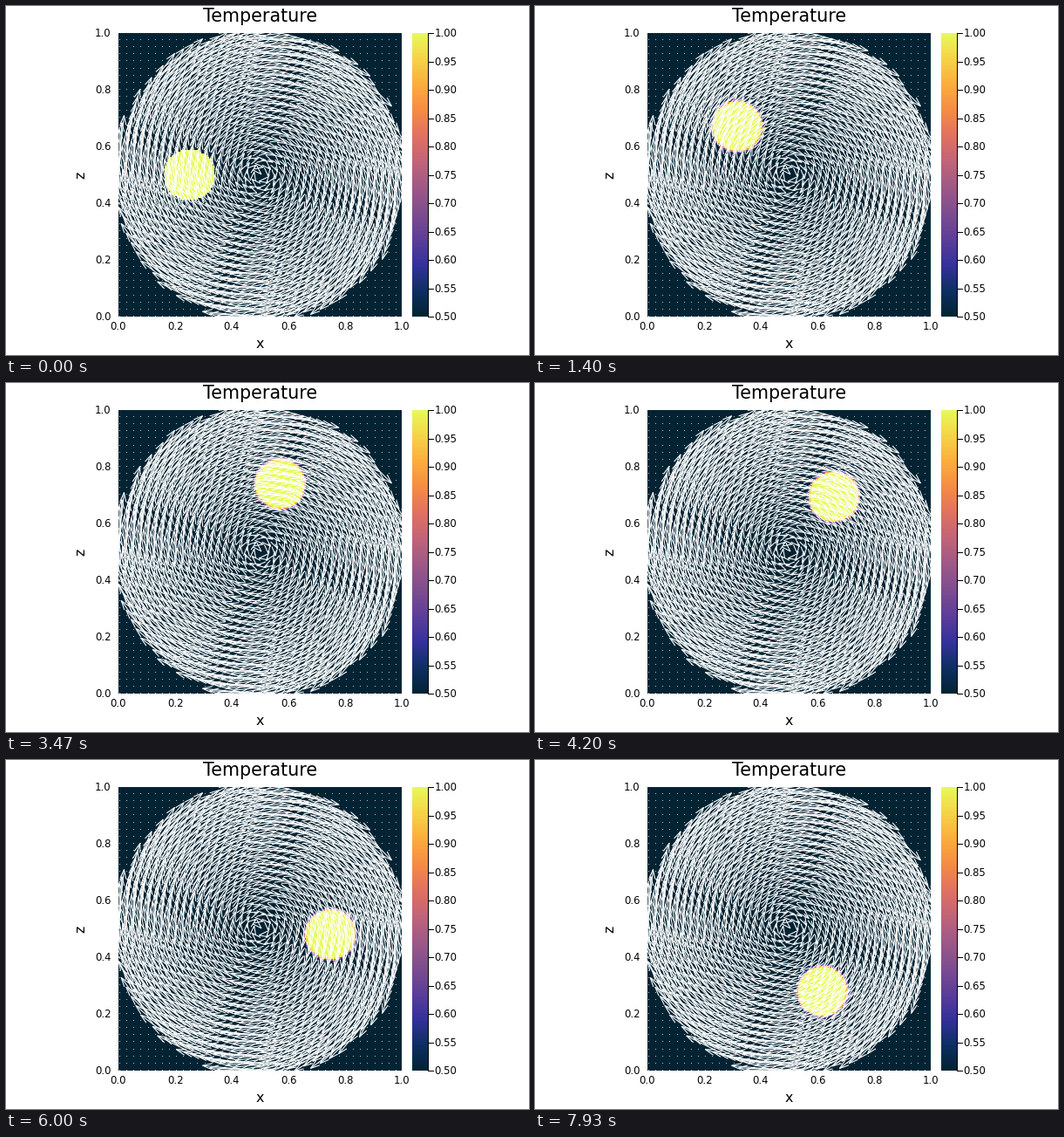
Write a matplotlib script that moves like this. It is 600x400 px and loops after 8 s.

```python
import numpy as np
import matplotlib.pyplot as plt
from matplotlib.animation import FuncAnimation
from matplotlib.collections import LineCollection
from matplotlib.colors import LinearSegmentedColormap

W, H, DPI = 600, 400, 100
LEFT, TOP, SIDE = 129, 31, 325
BOTTOM, RIGHT = TOP + SIDE, LEFT + SIDE
FRAMES, LOOP = 120, 8000
TURN = np.radians(2.05)        # clockwise turn per frame
CELLS, STEP = 160, 4           # one arrow for every STEP cells
REACH = 0.314                  # arrow length per unit of radius
PT = 72 / DPI                  # points per pixel

plt.rcParams["font.family"] = "DejaVu Sans"
thermal = LinearSegmentedColormap.from_list("thermal", [
    "#032333", "#0d3064", "#35329b", "#5d3e99", "#7e4d8f", "#9e5987",
    "#c16479", "#e17161", "#f68b45", "#fbad3c", "#f6d346", "#e7fa5a"])
centres = (np.arange(CELLS) + 0.5) / CELLS

fig = plt.figure(figsize=(W / DPI, H / DPI), dpi=DPI, facecolor="white")
ax = fig.add_axes([0, 0, 1, 1])
ax.set_axis_off()


def label(x, y, text, size, **kw):
    ax.text(x, y, text, fontsize=size * PT, color="black", **kw)


def line(xs, ys, **kw):
    ax.plot(xs, ys, color="black", lw=PT, **kw)


def temperature(frame):
    """Hot disk carried round the centre; its rim softens slightly."""
    angle = np.pi - TURN * frame
    cx, cz = 0.5 + 0.25 * np.cos(angle), 0.5 + 0.25 * np.sin(angle)
    x, z = np.meshgrid(centres, centres)
    gap = 0.09 - np.hypot(x - cx, z - cz)
    width = 0.0002 + 0.0038 * min(1, frame / 12)
    return 0.75 + 0.25 * np.tanh(gap / width)


def arrow_field():
    """Shafts with open heads inside the round domain, dots outside it."""
    c = centres[::STEP] - 0.5
    x, z = (a.ravel() for a in np.meshgrid(c, c))
    inside = np.hypot(x, z) <= 0.5002
    pts = np.column_stack([x, -z]) * SIDE + [LEFT + SIDE / 2, TOP + SIDE / 2]
    tail = pts[inside]
    flow = np.column_stack([z, x])[inside] * SIDE * REACH
    tip = tail + flow
    unit = flow / np.hypot(*flow.T)[:, None]
    normal = unit[:, ::-1] * [-1, 1]
    back = tip - 10.5 * unit
    heads = np.stack([back + 3.4 * normal, tip, back - 3.4 * normal], axis=1)
    return list(np.stack([tail, tip], axis=1)) + list(heads), pts[~inside]


heat = ax.imshow(temperature(0), cmap=thermal, vmin=0.5, vmax=1,
                 origin="lower", interpolation="nearest", aspect="auto",
                 extent=(LEFT, RIGHT, BOTTOM, TOP))
ax.imshow(np.linspace(1, 0, 256)[:, None], cmap=thermal, aspect="auto",
          interpolation="nearest", extent=(466, 484, BOTTOM, TOP))

segments, dots = arrow_field()
field = LineCollection(segments, colors="white", linewidths=1.05 * PT, zorder=3)
field.set_clip_path(plt.Rectangle((LEFT, TOP), SIDE, SIDE,
                                  transform=ax.transData))
ax.add_collection(field)
ax.scatter(dots[:, 0], dots[:, 1], s=(1.1 * PT) ** 2, c="white",
           alpha=0.8, linewidths=0, zorder=3)

for k in range(6):
    v = k / 5
    x, y = LEFT + v * SIDE, BOTTOM - v * SIDE
    label(x, 371, f"{v:.1f}", 11.6, ha="center", va="baseline")
    label(120.5, y + 4.2, f"{v:.1f}", 11.6, ha="right", va="baseline")
line([484, 484], [TOP, BOTTOM])
for k in range(11):
    y = BOTTOM - k * SIDE / 10
    line([484, 490], [y, y])
    label(491.5, y + 4.2, f"{0.5 + k / 20:.2f}", 11.6, va="baseline")

label(292, 18, "Temperature", 20.7, ha="center", va="baseline")
label(291.5, 391.5, "x", 15.9, ha="center", va="baseline")
label(86, 193.5, "z", 15.9, ha="center", va="center", rotation=90)

ax.set_xlim(0, W)
ax.set_ylim(H, 0)


def draw(frame):
    heat.set_data(temperature(frame))
    return heat,


anim = FuncAnimation(fig, draw, frames=FRAMES, interval=LOOP / FRAMES,
                     repeat=True, repeat_delay=0, blit=False)
plt.show()
```
